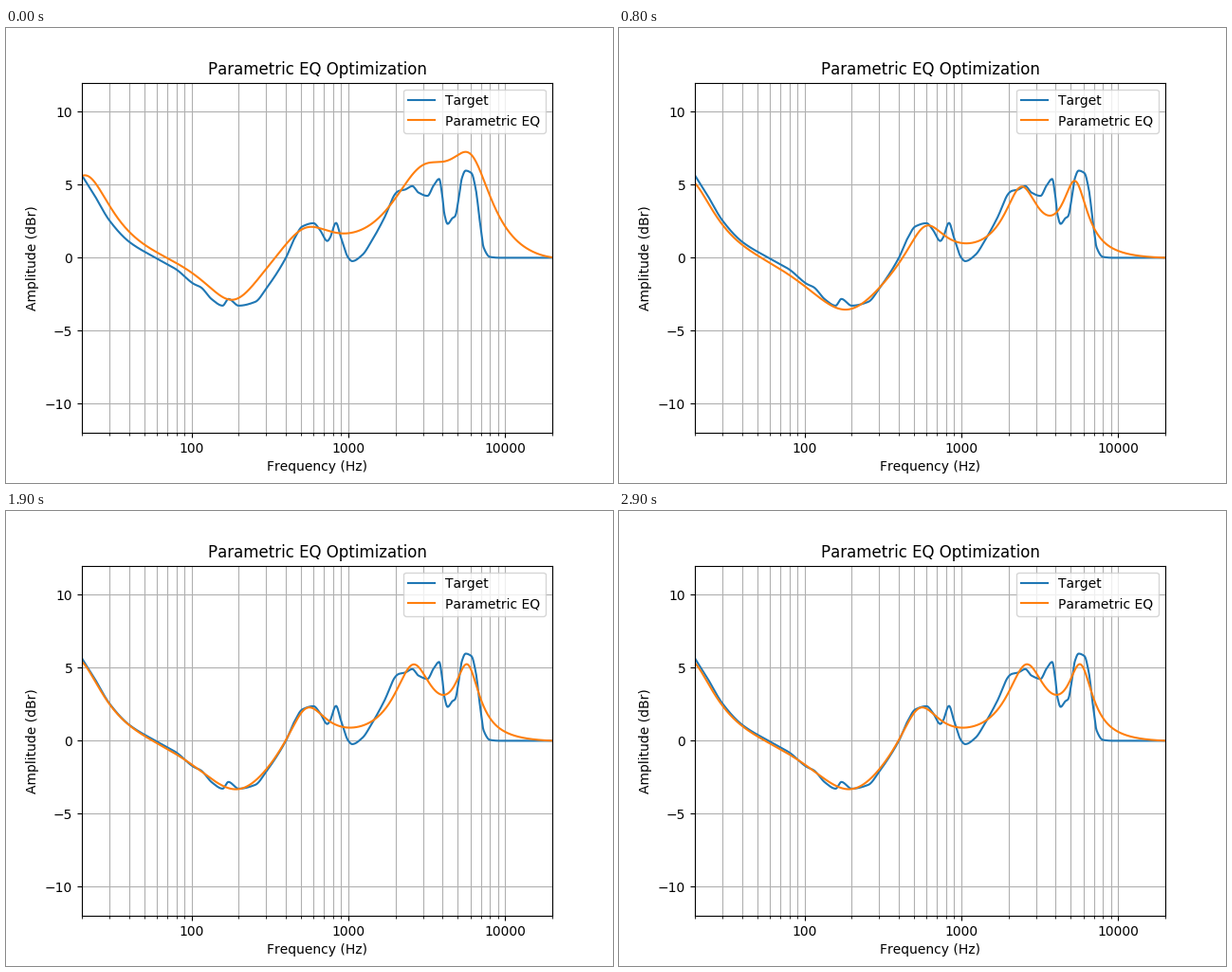
A matplotlib script that plays this animation: 640x480 px, repeating every 3 s.

```python
import numpy as np
import matplotlib.pyplot as plt
from matplotlib.animation import FuncAnimation
from matplotlib.ticker import FuncFormatter, NullFormatter

FRAMES = 30
STEP_MS = 100
RATE = 44100

# Measured response: key points as (Hz, dB)
measured = [
    (20, 5.65), (24, 4.3), (30, 2.55), (40, 1.1), (60, -0.05), (80, -0.8),
    (103, -1.78), (115, -2.03), (135, -2.85), (158, -3.28), (172, -2.82),
    (200, -3.28), (255, -3.02), (300, -2.1), (400, 0), (450, 1.25),
    (510, 2.15), (600, 2.37), (660, 1.9), (735, 1.15), (765, 1.38),
    (835, 2.39), (900, 1.35), (1000, 0), (1060, -0.23), (1230, 0.2),
    (1400, 1.1), (1700, 2.75), (2000, 4.4), (2100, 4.58), (2300, 4.67),
    (2560, 4.91), (2800, 4.47), (3200, 4.24), (3500, 4.95), (3800, 5.4),
    (3980, 4.2), (4100, 3.0), (4300, 2.32), (4600, 2.7), (4800, 2.85),
    (5100, 4.3), (5300, 5.45), (5600, 5.97), (6100, 5.8), (6500, 4.7),
    (6900, 2.5), (7300, 0.7), (8000, 0.06), (9200, 0), (20000, 0)]

# Five peaking filters, each row: centre Hz, gain dB, Q
start = np.array([(20, 5.7, 1.0), (185, -3.3, 0.9), (530, 2.3, 1.0),
                  (2950, 5.0, 0.82), (6000, 5.35, 1.1)])
settled = np.array([(19.1, 5.7, 1.03), (200, -3.65, 0.65), (540, 3.22, 1.4),
                    (2600, 4.9, 1.4), (5750, 4.6, 2.0)])
overshoot = np.array([(0, -0.4, 0), (-25, -0.25, 0), (95, -0.6, 0),
                      (-340, -0.75, 0.3), (-800, 0.3, 0)])


def monotone(x, xk, yk):
    """Smooth cubic through key points that never overshoots them."""
    h = np.diff(xk)
    d = np.diff(yk) / h
    m = np.zeros_like(yk)
    m[0], m[-1] = d[0], d[-1]
    p, q = d[:-1], d[1:]
    same = p * q > 0
    m[1:-1][same] = 2 * p[same] * q[same] / (p[same] + q[same])
    i = np.clip(np.searchsorted(xk, x, side="right") - 1, 0, len(h) - 1)
    t = (x - xk[i]) / h[i]
    return ((1 + 2 * t) * (1 - t) ** 2 * yk[i] + t * (1 - t) ** 2 * h[i] * m[i]
            + t ** 2 * (3 - 2 * t) * yk[i + 1] + t ** 2 * (t - 1) * h[i] * m[i + 1])


def warp(f):
    return np.tan(np.pi * f / RATE)


def peaking(f, centre, gain, q):
    """Level in dB of one digital peaking filter."""
    ratio = warp(f) / warp(centre)
    u = (q * (ratio - 1 / ratio)) ** 2
    a = 10 ** (gain / 20)
    return 10 * np.log10((u + a) / (u + 1 / a))


def filters(frame):
    """The start fades out, the search overshoots and then settles."""
    fade = np.exp(-(frame / 2) ** 2)
    s = frame / 4
    swing = (s * np.exp(1 - s)) ** 2
    rows = settled + (start - settled) * fade + overshoot * swing
    # the lowest filter keeps hunting around its centre
    rows[0, 0] += 1.5 * np.cos(2 * np.pi * (frame - 1.5) / 10.5)
    return rows


def response(frame):
    return sum(peaking(freq, *row) for row in filters(frame))


freq = np.geomspace(20, 20000, 700)
hz, db = np.array(measured, float).T

# wider letter spacing of the plot's text
plt.rcParams["text.kerning_factor"] = 6

fig, ax = plt.subplots(figsize=(6.4, 4.8), dpi=100)
ax.set_xscale("log")
ax.set_xlim(20, 20000)
ax.set_ylim(-12, 12)
ax.set_yticks([-10, -5, 0, 5, 10])
ax.xaxis.set_major_formatter(FuncFormatter(lambda v, _: f"{v:.0f}"))
ax.xaxis.set_minor_formatter(NullFormatter())
ax.grid(True, which="both")
ax.set_title("Parametric EQ Optimization")
ax.set_xlabel("Frequency (Hz)")
ax.set_ylabel("Amplitude (dBr)")
ax.plot(freq, monotone(np.log10(freq), np.log10(hz), db),
        color="#1f77b4", label="Target")
fit_line, = ax.plot(freq, response(0), color="#ff7f0e", label="Parametric EQ")
ax.legend(loc="upper right")


def draw(frame):
    fit_line.set_ydata(response(frame))
    return fit_line,


anim = FuncAnimation(fig, draw, frames=FRAMES, interval=STEP_MS,
                     repeat=True, repeat_delay=0)
plt.show()
```
